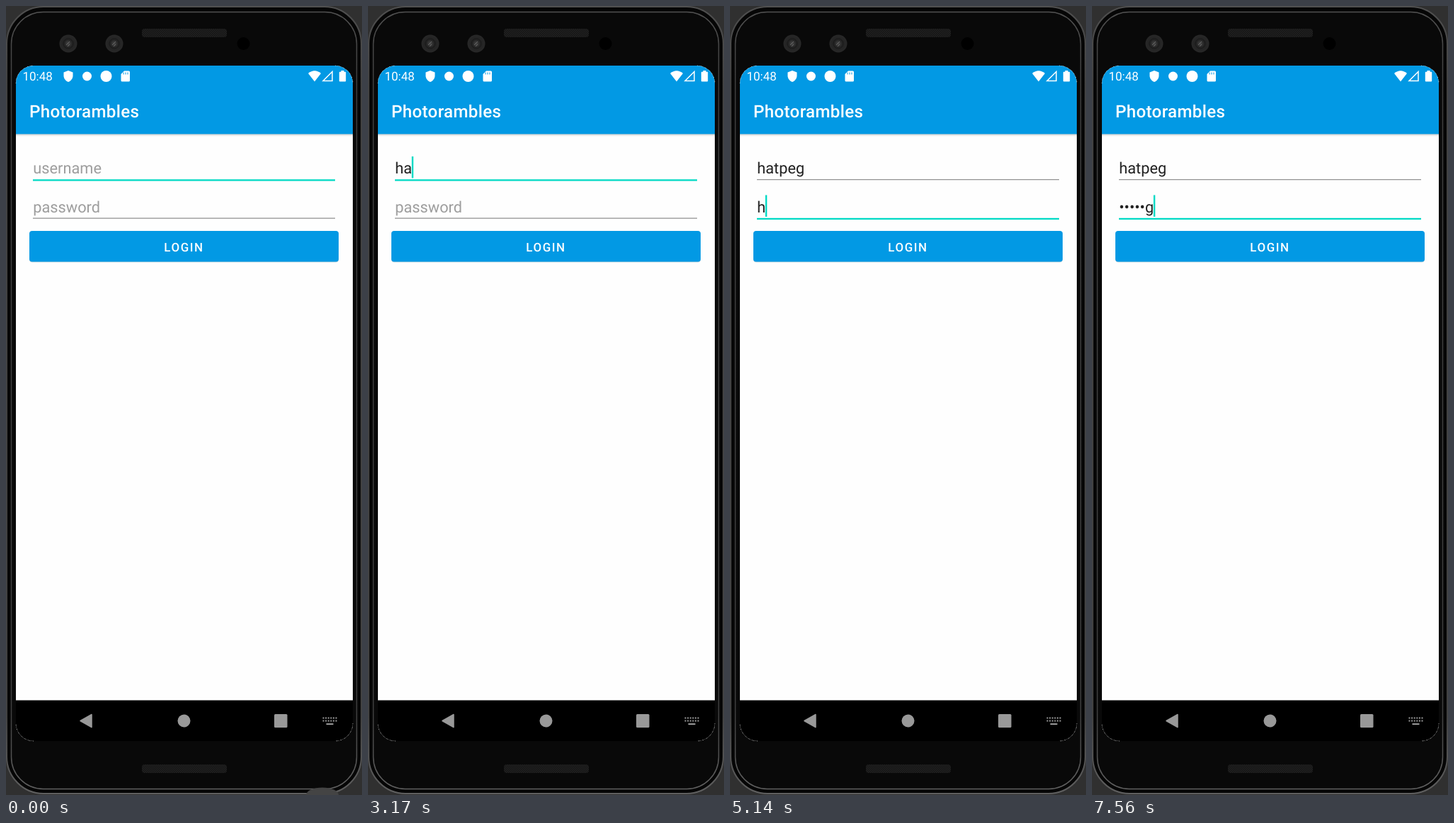
An HTML page for the animation above (8000 ms loop, 503 by 1112 pixels).

```html
<!DOCTYPE html>
<html lang="en">
<head>
<meta charset="utf-8">
<title>Login screen</title>
<style>
  html, body { margin: 0; width: 100%; height: 100%; overflow: hidden; background: #303030; }
  svg { display: block; width: 100%; height: 100%; font-family: Roboto, sans-serif; text-rendering: geometricPrecision; }
  .medium { font-weight: 500; fill: #fff; }
  .field { font-size: 21.8px; }
</style>
</head>
<body>
<svg viewBox="0 0 503 1112">
  <defs>
    <linearGradient id="rim" x2="0" y2="1">
      <stop offset="0" stop-color="#505050"/>
      <stop offset=".1" stop-color="#404040"/>
      <stop offset=".9" stop-color="#404040"/>
      <stop offset="1" stop-color="#606060"/>
    </linearGradient>
    <linearGradient id="shade" x2="0" y2="1">
      <stop offset="0" stop-color="#000" stop-opacity=".2"/>
      <stop offset="1" stop-color="#000" stop-opacity="0"/>
    </linearGradient>
    <radialGradient id="lens">
      <stop offset="0" stop-color="#484848"/>
      <stop offset=".45" stop-color="#222"/>
      <stop offset="1" stop-color="#282828"/>
    </radialGradient>
    <pattern id="mesh" width="3" height="3" patternUnits="userSpaceOnUse">
      <path fill="#222" d="M0 0h3v3H0z"/>
      <path fill="#141414" d="M0 0h1.5v1.5H0zM1.5 1.5H3V3H1.5z"/>
    </pattern>
    <clipPath id="screen"><rect x="14" y="84" width="476" height="952" rx="25"/></clipPath>
    <g id="camera">
      <circle r="12.5" fill="url(#lens)"/>
      <circle r="7" fill="none" stroke="#1a1a1a"/>
      <path d="M-3 2l5-5M-1 4l3-3" stroke="#666"/>
    </g>
    <rect id="grille" x="192" width="120" height="12" rx="4" fill="url(#mesh)"/>
  </defs>

  <!-- Phone body -->
  <rect width="503" height="1112" fill="#303030"/>
  <rect x="1" y="1" width="501" height="1109" rx="52" fill="#060606" stroke="url(#rim)" stroke-width="2"/>
  <rect x="7.5" y="8.5" width="488" height="1095" rx="45" fill="#090909" stroke="url(#rim)" stroke-width="1.5"/>
  <ellipse id="glint" cx="447" cy="1112" rx="23" ry="10.5" fill="#444"/>
  <use href="#grille" y="32"/>
  <use href="#grille" y="1069"/>
  <use href="#camera" x="88" y="53"/>
  <use href="#camera" x="153" y="53"/>
  <circle cx="335.5" cy="53" r="9" fill="#000"/>

  <g clip-path="url(#screen)">
    <rect x="14" y="84" width="476" height="952" fill="#fefefe"/>
    <rect x="14" y="180" width="476" height="4" fill="url(#shade)"/>
    <rect x="14" y="84" width="476" height="96.5" fill="#0299e4"/>
    <rect x="14" y="978.5" width="476" height="57.5" fill="#000"/>
  </g>
  <path d="M14 109a25 25 0 0 1 25-25M465 84a25 25 0 0 1 25 25M490 1011a25 25 0 0 1-25 25M39 1036a25 25 0 0 1-25-25"
        fill="none" stroke="#fff" stroke-opacity=".6" stroke-dasharray="1 5"/>

  <!-- Status bar -->
  <g fill="#fff">
    <text x="23.5" y="105" font-size="17">10:48</text>
    <path d="M88 91l6.5 2.6v4.6c0 4-2.8 7.4-6.5 8.8-3.7-1.4-6.5-4.8-6.5-8.8v-4.6z"/>
    <circle cx="114.5" cy="99" r="6.5"/>
    <circle cx="141.5" cy="99" r="8"/>
    <path d="M167 91.5h6.500q1.500 0 1.500 1.500v12q0 1.500-1.500 1.500h-9.500q-1.500 0-1.500-1.500v-9z"/>
    <path d="M427 95q9-7.500 18 0l-9 11.500z"/>
    <path d="M461 92.5v13h-13z" fill="none" stroke="#fff" stroke-width="1.5"/>
    <path d="M473.5 91h4v1.7h1.7q1 0 1 1v11.800q0 1-1 1h-7.400q-1 0-1-1v-11.800q0-1 1-1h1.700z"/>
    <path d="M166 93.5v3M169 93.5v3M172 93.5v3" stroke="#0299e4"/>
  </g>
  <text class="medium" x="33" y="156.7" font-size="24.2" letter-spacing=".3">Photorambles</text>

  <!-- Form -->
  <g class="field">
    <text id="user" x="38.2" y="236"></text>
    <text id="pass" x="38.2" y="290.5"></text>
  </g>
  <rect id="userLine" x="38" width="427"/>
  <rect id="passLine" x="38" width="427"/>
  <rect id="caret" width="2.4" height="30.5" fill="#03dac5"/>
  <rect x="33" y="317.5" width="437" height="43.8" rx="4" fill="#000" opacity=".14"/>
  <rect x="33" y="317" width="437" height="43.5" rx="4" fill="#0299e4"/>
  <text class="medium" x="223.3" y="345.5" font-size="16.95" letter-spacing="1.51">LOGIN</text>

  <!-- Navigation bar -->
  <g fill="#999">
    <path d="M105 1007.5l16-9v18z" stroke="#999" stroke-width="1.5" stroke-linejoin="round"/>
    <circle cx="251.5" cy="1007.5" r="9"/>
    <rect x="379" y="998" width="18.5" height="19" rx="1.5"/>
    <path d="M447.5 1003.5h20M447.5 1007.5h20" stroke="#999" stroke-width="2" stroke-dasharray="2 1.6"/>
    <rect x="452.5" y="1011" width="10" height="2"/>
  </g>
</svg>
<script>
  const LOOP = 8000;
  const LEFT = 38.2;
  const el = id => document.getElementById(id);

  // Each step: start time, focused field, user text, password text, caret shown.
  const name = 'hatpeg';
  const typed = n => name.slice(0, n);
  const masked = (n, last = name[n - 1]) => '•'.repeat(n - 1) + last;
  const user = (t, n, caret = true) => ({ t, focus: 'user', user: typed(n), pass: '', caret });
  const pass = (t, text, caret = true) => ({ t, focus: 'pass', user: name, pass: text, caret });

  const steps = [
    user(0, 0, false), user(270, 0), user(750, 0, false), user(1300, 0),
    user(1760, 0, false), user(2240, 0),
    user(2770, 1), user(3170, 2), user(3560, 3), user(3960, 4), user(4110, 5), user(4190, 6),
    pass(4420, ''), pass(4890, '', false), pass(5140, masked(1)),
    pass(5450, masked(2, 't')), pass(6000, masked(2, 't'), false), pass(6460, masked(2, 't')),
    pass(6860, masked(2)), pass(7320, masked(3)), pass(7490, masked(5)), pass(7560, masked(6))
  ];

  const fields = [
    { id: 'user', hint: 'username', top: 212, line: 244 },
    { id: 'pass', hint: 'password', top: 266.5, line: 298.5 }
  ];

  function set(id, attributes) {
    for (const key in attributes) el(id).setAttribute(key, attributes[key]);
  }

  function show(step) {
    for (const { id, hint, top, line } of fields) {
      const text = el(id);
      text.textContent = step[id] || hint;
      set(id, { fill: step[id] ? '#212121' : '#9e9e9e' });
      if (step.focus === id) {
        const width = step[id] ? text.getComputedTextLength() : 0;
        set(id + 'Line', { y: line + 0.3, height: 2.3, fill: '#03dac5' });
        set('caret', { x: LEFT + width - 0.3, y: top });
      } else {
        set(id + 'Line', { y: line, height: 1.3, fill: '#949494' });
      }
    }
    el('caret').style.visibility = step.caret ? 'visible' : 'hidden';
  }

  const start = performance.now();
  let current;
  function tick() {
    const time = (performance.now() - start) % LOOP;
    const step = steps.findLast(s => s.t <= time);
    if (step !== current) show(current = step);
    el('glint').style.visibility = time < 70 ? 'visible' : 'hidden';
    requestAnimationFrame(tick);
  }
  tick();
</script>
</body>
</html>
```
